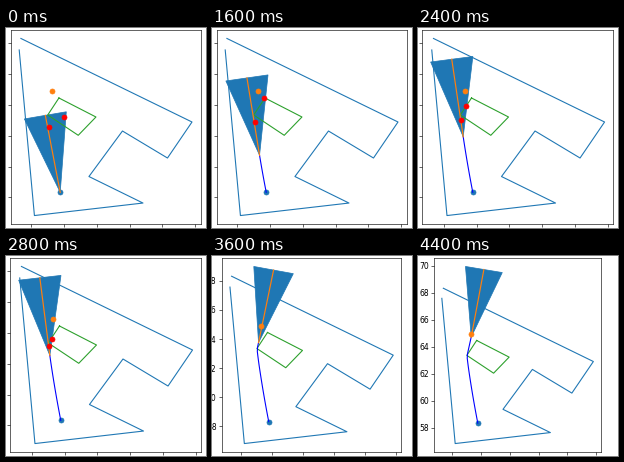
A matplotlib script for the animation above (4600 ms loop, 200 by 200 pixels).

```python
import numpy as np
import matplotlib.pyplot as plt
from matplotlib.animation import FuncAnimation

FRAMES, STEP_MS = 23, 200
TURN = 16              # step at which the corner is reached
REACH, HALF = 78.2, 20  # sensor cone length and half width
STRETCH = 1.065        # horizontal to vertical unit ratio
TOP, BOTTOM, MID = 1.6, 196.4, 99.6
PT = 0.72              # points per pixel at 100 dpi

room = np.array([(13.3, 22), (28.5, 187.5), (137, 175), (83, 148.5),
                 (116.5, 103), (161.5, 130), (186, 94), (15, 10.5)])
block = np.array([(53, 70), (90, 89), (72.3, 107.3), (41.8, 87), (53, 70)])
start, goal = (54.3, 164.3), (46.5, 63)


def heading(i):
    """Heading in degrees, clockwise from straight up."""
    if i < TURN:
        return -(10.3 - 0.2 * i - 0.3 * max(0, i - 12))
    return np.interp(i, [TURN, TURN + 1, TURN + 2, 21], [-4.6, 3, 11, 10])


def walk():
    pts = [start]
    for i in range(TURN):
        x, y = pts[-1]
        slope = np.tan(np.radians(heading(i)))
        pts.append((x + 4.63 * slope * STRETCH, y - 4.63))
    x, y = pts[-1]
    pts.append((x + 0.2, y - 4.6))
    x, y = pts[-1]
    for k in range(1, 5):
        pts.append((x + 1.08 * k, y - 4.87 * k))
    pts.append(pts[-1])
    return np.array(pts)


def cone(i):
    a = np.radians(heading(i))
    ahead = np.array([np.sin(a) * STRETCH, -np.cos(a)])
    side = np.array([np.cos(a) * STRETCH, np.sin(a)])
    tip = path[i]
    base = tip + REACH * ahead
    return tip, base, base - HALF * side, base + HALF * side


def hits(i):
    """Two detected points, lost once the corner is passed."""
    if i > TURN:
        return [], []
    keys = [0, 4, 8, 12, 16]
    left = np.interp(i, keys, [43] * 4 + [42.8]), np.interp(i, keys, [99, 97, 94, 92, 88])
    right = (np.interp(i, keys, [58.5, 57.2, 52.4, 48, 42.8]),
             np.interp(i, keys, [89, 70.5, 70.3, 77.7, 88]))
    return zip(left, right)


path = walk()

fig = plt.figure(figsize=(2, 2), dpi=100, facecolor="white")
ax = fig.add_axes([0, 0, 1, 1])
ax.set_xticks(25.3 + 32.8 * np.arange(6), [""] * 6)
ax.set_yticks(169.4 - 30.8 * np.arange(7), [str(v) for v in range(58, 71, 2)])
ax.tick_params(length=2.6 * PT, width=0.6 * PT, pad=2.6 * PT, labelsize=7.6 * PT)
for spine in ax.spines.values():
    spine.set_linewidth(0.6 * PT)


def line(color, width, pts=((0, 0),), z=2):
    return ax.plot(*zip(*pts), color=color, lw=width * PT, zorder=z)[0]


def dots(color, pts=((0, 0),), z=2):
    return ax.plot(*zip(*pts), "o", color=color, ms=5 * PT, mew=0.7 * PT, zorder=z)[0]


line("C0", 1.1, room)
line("C2", 1.1, block)
dots("C0", [start])
dots("C1", [goal], 5)
view = ax.fill([0, 1, 1], [0, 0, 1], color="C0", lw=0.7 * PT, zorder=1)[0]
trail = line("blue", 1.1, z=3)
axis = line("C1", 1.2, z=4)
found = dots("red", z=6)


def fit(corners):
    """Autoscale with 5% margins, equal aspect, centred on the stage."""
    pts = np.vstack([room, corners])
    lo, hi = pts.min(0), pts.max(0)
    pad = 0.05 * (hi - lo)
    lo, hi = lo - pad, hi + pad
    wide = (hi[0] - lo[0]) * (BOTTOM - TOP) / (hi[1] - lo[1])
    ax.set_position([(MID - wide / 2) / 200, 1 - BOTTOM / 200,
                     wide / 200, (BOTTOM - TOP) / 200])
    ax.set_xlim(lo[0], hi[0])
    ax.set_ylim(hi[1], lo[1])


def draw(i):
    tip, base, left, right = cone(i)
    view.set_xy([tip, left, right])
    axis.set_data(*zip(tip, base))
    trail.set_data(*path[:i + 1].T)
    found.set_data(*hits(i))
    fit([tip, left, right])
    return view, axis, trail, found


anim = FuncAnimation(fig, draw, frames=FRAMES, interval=STEP_MS,
                     repeat=True, repeat_delay=0, blit=False)
plt.show()
```
